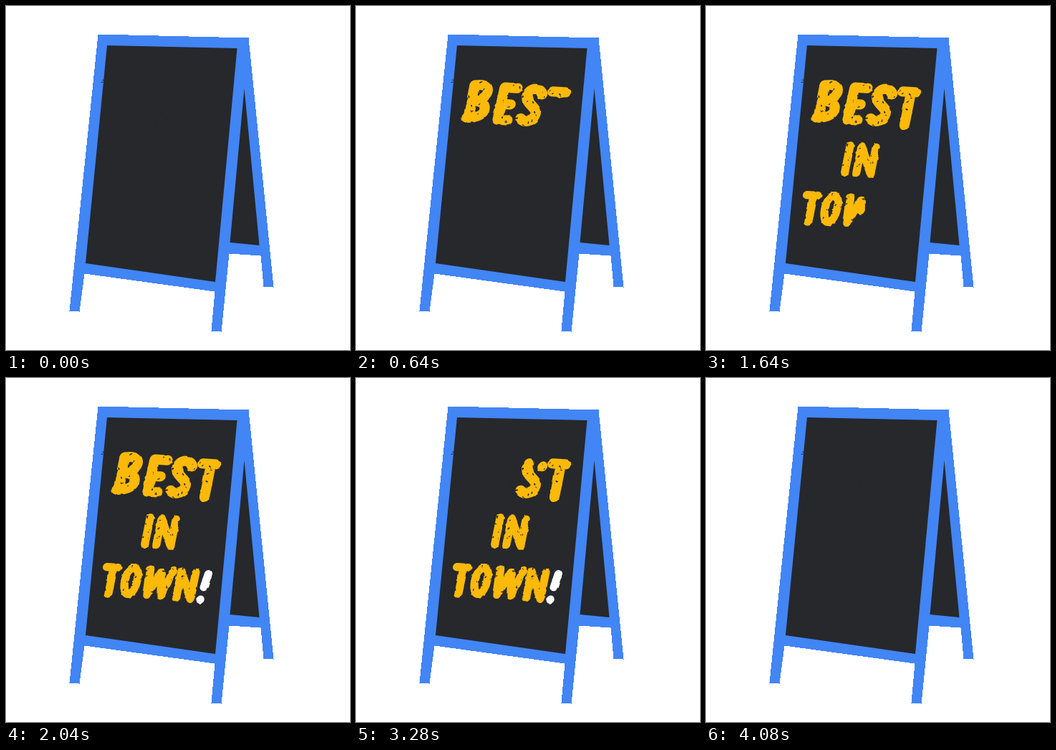
An HTML page for the animation above (4.4 s loop, 480 by 480 pixels).

```html
<!DOCTYPE html>
<html lang="en">
<head>
<meta charset="utf-8">
<title>Chalkboard sign</title>
<style>
  html, body { margin: 0; width: 100%; height: 100%; overflow: hidden; background: #fff; }
  svg { display: block; width: 100vw; height: 100vh; }
  .frame { fill: #4285f4; shape-rendering: crispEdges; }
  .board { fill: #26282c; }
  .words path { fill: none; stroke: #fbb909; stroke-width: 14; stroke-linecap: round; stroke-linejoin: round; }
  .words .white path { stroke: #fff; }
  .specks { stroke: #26282c; stroke-linecap: round; }
</style>
</head>
<body>
<svg viewBox="0 0 480 480" role="img" aria-label="BEST IN TOWN!">
  <filter id="rough" filterUnits="userSpaceOnUse" x="0" y="0" width="480" height="480" color-interpolation-filters="sRGB">
    <feTurbulence type="fractalNoise" baseFrequency="0.1" numOctaves="2" seed="4"/>
    <feDisplacementMap in="SourceGraphic" scale="3" xChannelSelector="R" yChannelSelector="G"/>
  </filter>
  <path class="frame" transform="translate(.5 .5)" d="M128 39 338 44 373 392 359 391 355 348 311 345 300 454 286 453 291 398 109 373 102 426 88 425Z"/>
  <path class="board" d="M141 55 322.500 59 292 385 111 359ZM332.500 115 353.500 334 312.500 330Z"/>
  <g class="words" filter="url(#rough)">
    <g id="yellow"></g>
    <g id="specks" class="specks"></g>
    <g id="white" class="white"></g>
  </g>
</svg>
<script>
const LOOP = 4400, STEP = 40;
const PEN_LIFT = 12; // extra pen travel before each stroke
const SLOPE = 0.07, SLANT = -0.2;

// Brush strokes of each letter on a 60-unit-high grid, and its advance.
const font = {
  B: { advance: 43, strokes: ['M9 8V53', 'M9 8C33 2 35 22 16 29C37 32 33 54 7 53'] },
  E: { advance: 33, strokes: ['M26 8H8L7 53H21', 'M9 31H21'] },
  S: { advance: 35, strokes: ['M29 14C24 4 8 5 8 17S26 32 25 42S12 56 5 49'] },
  T: { advance: 36, strokes: ['M7 9H26', 'M19 10V55'] },
  I: { advance: 21, strokes: ['M8 8V54'] },
  N: { advance: 41, strokes: ['M7 54V8L32 54V8'] },
  O: { advance: 38, strokes: ['M20 7C2 7 4 53 17 53S33 7 18 7'] },
  W: { advance: 56, strokes: ['M9 8 12 52 28 12 36 52 49 8'] },
  '!': { advance: 20, strokes: ['M13 9 10 32', 'M8 54v.1'] }
};

// Words that are written, and later wiped, in one go.
const passes = [
  { words: [{ text: 'BEST', x: 158, y: 102, size: 1 }, { text: 'IN', x: 196, y: 188, size: 0.8 }],
    write: [60, 1000], wipe: [3010, 3600] },
  { words: [{ text: 'TOWN!', x: 136.5, y: 256, size: 0.8 }],
    write: [1160, 2040], wipe: [3600, 4080] }
];

function add(parent, tag, attrs) {
  const el = document.createElementNS('http://www.w3.org/2000/svg', tag);
  for (const key in attrs) el.setAttribute(key, attrs[key]);
  return parent.appendChild(el);
}

function layOut({ text, x, y, size }) {
  const matrix = [size, SLOPE * size, SLANT * size, size, x, y];
  let pen = 0;
  return [...text].flatMap(char => {
    const layer = document.getElementById(char === '!' ? 'white' : 'yellow');
    const transform = `matrix(${matrix}) translate(${pen})`;
    pen += font[char].advance;
    return font[char].strokes.map(d => add(layer, 'path', { d, transform }));
  });
}

for (const pass of passes) {
  pass.travel = 0;
  pass.strokes = pass.words.flatMap(layOut).map(el => {
    const length = el.getTotalLength();
    const start = pass.travel + PEN_LIFT;
    pass.travel = start + length;
    return { el, start, length };
  });
}

let seed = 11;
function random(min, max) {
  seed = (seed * 16807) % 2147483647;
  return min + (max - min) * seed / 2147483647;
}

// Board-coloured chips show only where they cross the paint.
for (let i = 0; i < 220; i++) {
  const x1 = random(134, 296), y1 = random(102, 314);
  add(document.getElementById('specks'), 'line', {
    x1, y1, x2: x1 + random(-2, 2), y2: y1 + random(-2, 2), 'stroke-width': random(0.6, 2)
  });
}

const clamp = value => Math.min(1, Math.max(0, value));
const progress = (t, [start, end]) => clamp((t - start) / (end - start));

function draw(time) {
  const t = Math.floor((time % LOOP) / STEP) * STEP;
  for (const { strokes, travel, write, wipe } of passes) {
    const written = progress(t, write) * travel;
    const wiped = progress(t, wipe) * travel;
    for (const { el, start, length } of strokes) {
      const head = clamp((written - start) / length) * length;
      const tail = clamp((wiped - start) / length) * length;
      el.style.display = head > tail ? '' : 'none';
      el.setAttribute('stroke-dasharray', `0 ${tail} ${head - tail} ${length + 1}`);
    }
  }
}

let origin;
function tick(now) {
  origin ??= now;
  draw(now - origin);
  requestAnimationFrame(tick);
}
draw(0);
requestAnimationFrame(tick);
</script>
</body>
</html>
```
